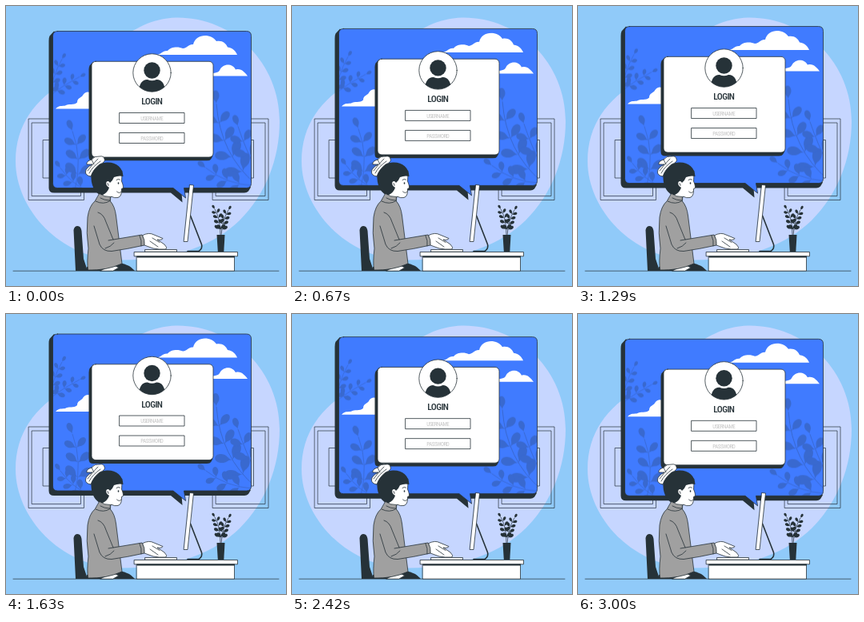
Recreate the animation shown at these times as an HTML page. Size 350x350 px, loop 3.04 s.

```html
<!DOCTYPE html>
<html lang="en">
<head>
<meta charset="utf-8">
<title>Login illustration</title>
<style>
  html, body { margin: 0; width: 100%; height: 100%; overflow: hidden; background: #90caf9; }
  svg { display: block; width: 100vw; height: 100vh; }
  text { font-family: Oswald, "Roboto Condensed", "Liberation Sans Narrow", Roboto, sans-serif; font-stretch: 75%; text-anchor: middle; }
  .dark { fill: #263238; }
  .line { fill: none; stroke: #263238; stroke-width: .8; stroke-linecap: round; stroke-linejoin: round; }
  .white { fill: #fff; }
  .fill-white { fill: #fff; }
  .fill-blue { fill: #407bff; }
  .fill-grey { fill: #a0a0a0; }
  .title { font-size: 11.6px; font-weight: 500; letter-spacing: -.6px; }
  .hint { fill: #c4c4c4; font-size: 7px; letter-spacing: -.5px; }
</style>
</head>
<body>
<svg viewBox="0 0 350 350">
  <clipPath id="panel"><rect x="58.5" y="31" width="248" height="196" rx="6"/></clipPath>
  <clipPath id="disc"><circle cx="182.5" cy="83.3" r="23.4"/></clipPath>

  <path fill="#c6d6ff" d="M213 14.500C285 14 342 72 342 144C342 192 324 236 292 268C262 297 215 318 142 317.500C68 316 12 254 12 194C12 149 36 116 76 94C125 66 150 17 213 14.500Z"/>

  <!-- wall frames and floor -->
  <g class="line" style="stroke-width:.7">
    <path d="M28.500 141H97.500V242.500H28.500ZM32.500 146H93.500V237.500H32.500ZM46.500 167.500H80V215H46.500Z"/>
    <path d="M258.500 141H328V242.500H258.500ZM262.500 146H324V237.500H262.500ZM276 167.500H309.500V215H276Z"/>
    <path d="M9 331.200H341"/>
  </g>

  <g id="bubble">
    <path class="dark" d="M60 31L54.500 37Q53.500 39 53.500 43V227Q53.500 233 60 233H206L220.500 245L219.500 233H298Q301 233 303 231L306 226Z"/>
    <path class="line fill-blue" d="M64.500 31H300.500Q306.500 31 306.500 37V221Q306.500 227 300.500 227H222.500L224.500 239.500L209 227H64.500Q58.500 227 58.500 221V37Q58.500 31 64.500 31Z"/>
    <g clip-path="url(#panel)">
      <g id="foliage" class="dark" opacity=".24"></g>
      <g class="white">
        <path d="M188 60.500C195 60 195 55 202 55.500C206 50 216 50 221 52.500C227 52 228 47 234 47.500C237 34 256 33 263 43.500C270 42 275 46 277 51C284 52 287 56 289 60.500Z"/>
        <path d="M252 87C258 81 264 85 267 80C271 71 283 71 287 79C294 77 298 82 302 87Z"/>
        <path d="M62 128C66 123 71 125 74 124C78 121 85 124 89 120C89 114 95 114 96 111C99 106 104 106 108 109V128Z"/>
      </g>
    </g>

    <path class="dark" d="M109 69L104.500 74Q103.500 76 103.500 79V188Q103.500 193 109 193H251Q255 193 256.500 190.500L258.500 187Z"/>
    <rect class="line fill-white" x="107" y="68.800" width="152" height="119.700" rx="5"/>
    <circle class="line fill-white" cx="182.500" cy="83" r="23.700"/>
    <g class="dark" clip-path="url(#disc)">
      <circle cx="182.500" cy="80" r="10.200"/>
      <path d="M166 108C166 96 171 91 177 91.500Q182.500 94 188 91.500C194 91 199 96 199 108Z"/>
    </g>
    <text class="dark title" x="182.300" y="122.800">LOGIN</text>
    <g class="line fill-white">
      <rect x="142" y="133" width="81" height="13"/>
      <rect x="142" y="158" width="81" height="13"/>
    </g>
    <text class="hint" x="182.300" y="142.200">USERNAME</text>
    <text class="hint" x="182.300" y="167.200">PASSWORD</text>
  </g>

  <!-- chair and legs -->
  <path class="dark" d="M84.500 280Q85.500 275 89.500 275Q93.500 275 94.500 281L97 316L102 331H87Z"/>
  <path class="dark" d="M101 331V326L142 321Q154 323 161 331Z"/>
  <path class="line fill-white" d="M118 331Q126 326 137 325L141 327L134 331Z"/>

  <!-- desk -->
  <g class="line fill-white">
    <rect x="163.500" y="313" width="122" height="18.200"/>
    <rect x="160.500" y="307.500" width="129" height="5.300"/>
  </g>
  <path class="dark" d="M163.500 312.500H286V314.500H163.500Z"/>

  <!-- monitor -->
  <path class="line" style="stroke-width:1.600" d="M230.500 262L244.500 298Q246 303 241 306.500H227"/>
  <path class="line fill-white" d="M229.800 223.500L234.500 224L227 294.500L222.500 294.500Z"/>

  <!-- potted plant -->
  <g id="plant" class="dark"></g>
  <path class="dark" d="M263.500 286H273.500L272.300 307H264.800Z"/>

  <!-- person -->
  <path class="line fill-white" d="M124 207L145 206Q145 213 144.500 219Q147.500 226 146 228L144.500 228.500Q145 238 140 239.500Q136 240.500 131 238L130 246H116Z"/>
  <path class="dark" d="M106.500 216C106 203 115 196 126 195.500C138 195 146 202 146.500 213Q141 211.500 135 214Q133 219 130 221Q128 217.500 125.500 220Q124 224 129 227Q127 234 119 237C112 234 107 226 106.500 216Z"/>
  <path class="line fill-white" d="M106 213Q99 212 99.500 207Q100 202 108 198L101 198Q100 194 107 192Q111 187 117 188Q122 187 123 191Q125 195 117 198Q109 204 106 213Z"/>
  <path class="line" d="M104 209Q108 201 118 194M102 206Q107 199 115 191M110 198L107 192"/>
  <path class="line" d="M138 217.500Q140 215.500 142.500 217M138.500 232Q141.500 235 144 232M126.500 222Q128 220.500 128 224.500"/>
  <ellipse class="dark" cx="140.500" cy="221.500" rx=".8" ry="1.200"/>

  <path class="line fill-grey" d="M117 234.500Q123 239 130.500 238.500L130 243.500Q136 250 137.500 262L141 290L145 322Q125 331 102.500 330Q101 320 103 303Q100 284 102 264Q104 250 111 244Z"/>
  <path class="line" d="M112 244Q122 249 130 243.500M118 240Q123 243 129 243"/>
  <path class="line fill-white" d="M171 286.500Q179 282.500 185 286L196 290.500Q195 293 189 292L198 298Q202 302 200 304Q191 304.500 184 303L173 299Z"/>
  <path class="line" d="M183 290L192 295.500M180 294L190 301"/>
  <path class="line fill-grey" d="M115 258Q122 260 125 270L134 292L170 286Q174 292 173 299Q151 304 132 306.500Q121 307 117 298L110 275"/>
  <path class="line" d="M134 292L128 293M167 287Q170 293 169 300M124 303Q131 301 135 296"/>
  <path class="line fill-white" d="M174 304.500H213.500V307.200H174Z"/>
</svg>
<script>
  const $ = id => document.getElementById(id);

  // A curved stem with pairs of leaves and one at the tip.
  function branch([x0, y0, x1, y1, x2, y2], pairs, size, width) {
    const leaf = (x, y, deg, s) =>
      `<path transform="translate(${x} ${y}) rotate(${deg}) scale(${s})" d="M0 0C.3-.02 .3-.26 .66-.25C1.1-.22 1.1 .22 .66 .25C.3 .26 .3 .02 0 0"/>`;
    let out = `<path d="M${x0} ${y0}Q${x1} ${y1} ${x2} ${y2}" fill="none" stroke="#263238" stroke-width="${width}"/>`;
    for (let i = 1; i <= pairs + 1; i++) {
      const t = i / (pairs + 1), u = 1 - t;
      const x = u * u * x0 + 2 * u * t * x1 + t * t * x2;
      const y = u * u * y0 + 2 * u * t * y1 + t * t * y2;
      const deg = Math.atan2(u * (y1 - y0) + t * (y2 - y1), u * (x1 - x0) + t * (x2 - x1)) * 180 / Math.PI;
      const s = size * (1.1 - .35 * t);
      out += i > pairs ? leaf(x, y, deg, s) : leaf(x, y, deg - 52, s) + leaf(x, y, deg + 52, s);
    }
    return out;
  }

  $("foliage").innerHTML =
    branch([54, 118, 57, 88, 70, 66], 4, 11, .7) +
    branch([54, 112, 72, 98, 92, 88], 3, 11, .7) +
    branch([86, 230, 96, 190, 83, 156], 3, 20, .8) +
    branch([104, 232, 82, 222, 68, 202], 3, 14, .8) +
    branch([312, 222, 268, 185, 263, 122], 4, 23, 1) +
    branch([312, 202, 300, 180, 290, 150], 2, 20, .9) +
    branch([308, 224, 275, 222, 250, 202], 3, 17, .8);

  $("plant").innerHTML =
    branch([268, 287, 268, 266, 261, 254], 4, 8, .7) +
    branch([269, 287, 270, 268, 278, 255], 4, 8, .7);

  const LOOP = 3040, RISE = 7, REST = .5;
  function draw(now) {
    const p = now % LOOP / LOOP;
    const lift = RISE * (1 - Math.abs(1 - 2 * p));
    $("bubble").setAttribute("transform", `translate(0 ${REST - lift})`);
    requestAnimationFrame(draw);
  }
  draw(performance.now());
</script>
</body>
</html>
```
